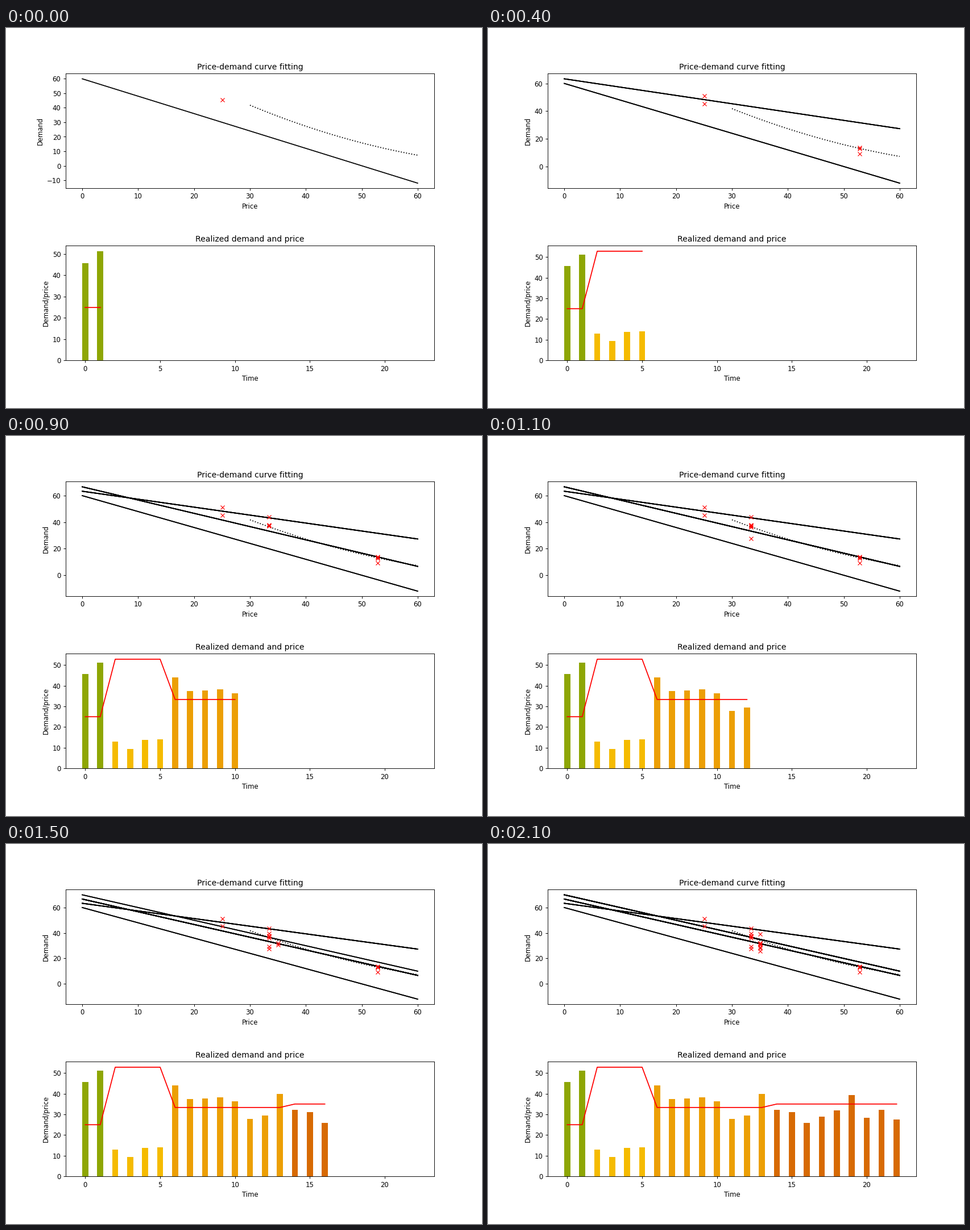
These frames come from a looping animation (837x669 px, 2.2 s). A matplotlib script:

```python
import numpy as np
import matplotlib.pyplot as plt
from matplotlib.animation import FuncAnimation

DPI = 84
W, H = 837, 669
STEPS = 22

plt.rcParams.update({"font.family": "DejaVu Sans", "font.size": 10})

# Linear demand hypotheses: demand = a - b * price
HYPOTHESES = [(60, 1.2), (190 / 3, 0.6), (200 / 3, 1.0), (70, 1.0)]
COLORS = ["#8EA604", "#F5BB00", "#EC9F05", "#D76A03"]

chosen = np.repeat([0, 1, 2, 3], [2, 4, 8, 9])
best_price = [a / (2 * b) for a, b in HYPOTHESES]
price = np.array([best_price[h] for h in chosen])
demand = np.array([45.6, 51.25, 13.0, 9.4, 13.7, 14.0, 44.0, 37.4,
                   37.7, 38.2, 36.4, 27.7, 29.5, 39.9, 32.3, 31.1,
                   25.9, 29.0, 31.8, 39.2, 28.4, 32.1, 27.5])
time = np.arange(len(demand))

# The small offset keeps the pixel size from being rounded down
size = ((W + 0.01) / DPI, (H + 0.01) / DPI)
fig, (top, low) = plt.subplots(2, 1, figsize=size, dpi=DPI)
fig.subplots_adjust(left=0.125, right=0.9, bottom=0.125, top=0.88, hspace=0.5)


def label(ax, title, xlabel, ylabel):
    ax.set_title(title)
    ax.set_xlabel(xlabel)
    ax.set_ylabel(ylabel)


label(top, "Price-demand curve fitting", "Price", "Demand")
label(low, "Realized demand and price", "Time", "Demand/price")

# Underlying demand curve
p = np.linspace(30, 60, 60)
u = (p - 30) / 10
top.plot(p, 41.8 - 16 * u + 1.5 * u ** 2, "k:")

# One fitted line per step; repeated fits are drawn on top of each other
fits = []
for h in chosen[:STEPS]:
    a, b = HYPOTHESES[h]
    fits += top.plot([0, 60], [a, a - 60 * b], "k-")
samples, = top.plot([], [], "rx", zorder=3)
top.set_xlim(-3, 63)

bars = low.bar(time, demand, width=0.4, color=[COLORS[h] for h in chosen])
path, = low.plot([], [], "r-")
low.set_xlim(-1.32, 23.32)


def update(i):
    for k, fit in enumerate(fits):
        fit.set_visible(k <= i)
    samples.set_data(price[:i + 1], demand[:i + 1])

    n = i + 2
    for k, bar in enumerate(bars):
        bar.set_visible(k < n)
    path.set_data(time[:n], price[:n])

    peak = max(HYPOTHESES[h][0] for h in chosen[:i + 1])
    pad = 0.05 * (peak + 12)
    top.set_ylim(-12 - pad, peak + pad)
    low.set_ylim(0, 1.05 * max(demand[:n].max(), price[:n].max()))
    return [*fits, samples, *bars, path]


anim = FuncAnimation(fig, update, frames=STEPS, interval=100,
                     init_func=lambda: update(0), repeat=True, blit=False)
plt.show()
```
